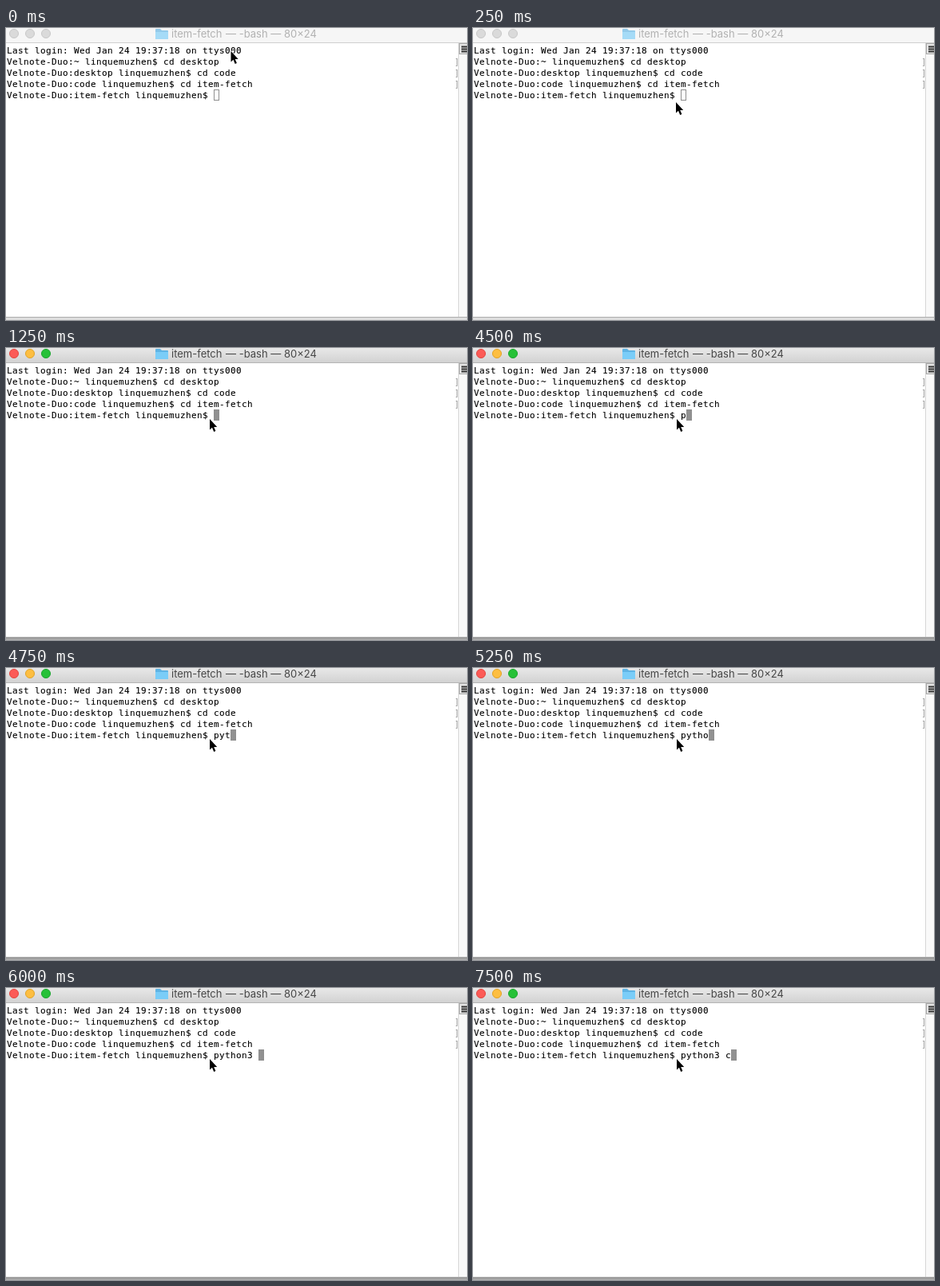
Recreate the animation shown at these times as an HTML page. Size 577 by 366 pixels, loop 8 s.

```html
<!DOCTYPE html>
<html lang="en">
<head>
<meta charset="utf-8">
<title>Terminal</title>
<style>
  html, body { margin: 0; overflow: hidden; background: #fff; }
  svg { display: block; }
  .term { font: 11px "DejaVu Sans Mono", monospace; letter-spacing: calc(7px - 1ch); white-space: pre; stroke: #000; stroke-width: .1px; }
  .mark { fill: #999; stroke: none; }
  .title { font: 13px Inter, sans-serif; fill: #b2b2b2; }
  .bar { fill: #f6f6f6; }
  .edge { fill: #cfcfcf; }
  .lights circle { fill: #dadada; stroke: #c8c8c8; }
  .folder { opacity: .65; }
  .shadow { fill: #dedede; }
  #caret { fill: #fff; stroke: #8f8f8f; }
  .active .title { fill: #474747; }
  .active .bar { fill: url(#chrome); }
  .active .edge { fill: #b4b4b4; }
  .active .lights circle { fill: var(--c); stroke: var(--s); }
  .active .folder { opacity: 1; }
  .active .shadow { fill: url(#drop); }
  .active #caret { fill: #919191; }
</style>
</head>
<body>
<svg id="stage" width="577" height="366" viewBox="0 0 577 366">
  <defs>
    <linearGradient id="chrome" x2="0" y2="1">
      <stop stop-color="#e8e8e8"/><stop offset="1" stop-color="#d2d2d2"/>
    </linearGradient>
    <linearGradient id="drop" x2="0" y2="1">
      <stop stop-color="#929292"/><stop offset="1" stop-color="#b4b4b4"/>
    </linearGradient>
  </defs>
  <rect width="577" height="366" fill="#fff"/>

  <rect class="bar" width="577" height="18"/>
  <rect class="edge" y="18" width="577" height="1"/>
  <g class="lights">
    <circle cx="10" cy="7" r="5.5" style="--c:#fc5b57;--s:#e2463f"/>
    <circle cx="30" cy="7" r="5.5" style="--c:#fdbe41;--s:#e1a325"/>
    <circle cx="50" cy="7" r="5.5" style="--c:#27c138;--s:#18a62b"/>
  </g>
  <g class="folder">
    <path d="M187 13V2q0-1 1-1h5l2 2h7q1 0 1 1v9q0 1-1 1h-14q-1 0-1-1z" fill="#5fb4e4"/>
    <path d="M187 5h16v8q0 1-1 1h-14q-1 0-1-1z" fill="#7acdf8"/>
  </g>
  <text class="title" x="207" y="12">item-fetch</text>
  <text class="title" x="275" y="12">— -bash — 80×24</text>

  <rect x="566" y="19" width="11" height="343" fill="#f9f9f9"/>
  <rect x="566" y="19" width="1" height="343" fill="#d6d6d6"/>
  <rect x="567.5" y="19.5" width="11" height="13" fill="#e4e4e4" stroke="#a8a8a8"/>
  <path d="M570 23.5h7M570 26.5h7M570 29.5h7" stroke="#333" stroke-width="2"/>

  <rect y="362" width="577" height="1" fill="#adadad"/>
  <rect class="shadow" y="363" width="577" height="3"/>

  <g id="lines"></g>
  <rect id="caret" y="77.5" width="6" height="13"/>
  <path id="pointer" d="M0 0V13.5L3 10.8L5.2 16L7.4 15L5.2 10H9.2Z"
        stroke="#fff" stroke-width="1.6" paint-order="stroke"/>
</svg>
<script>
const LOOP = 8000, CELL = 7, ROW = 14, LEFT = 1, BASELINE = 32;
const $ = id => document.getElementById(id);
const prompt = dir => `Velnote-Duo:${dir} linquemuzhen$ `;
const lastPrompt = prompt("item-fetch");

function addText(text, col, row, cls = "term") {
  const el = document.createElementNS("http://www.w3.org/2000/svg", "text");
  el.setAttribute("class", cls);
  el.setAttribute("x", LEFT + col * CELL);
  el.setAttribute("y", BASELINE + row * ROW);
  el.textContent = text;
  $("lines").append(el);
  return el;
}

["Last login: Wed Jan 24 19:37:18 on ttys000",
 prompt("~") + "cd desktop",
 prompt("desktop") + "cd code",
 prompt("code") + "cd item-fetch",
 lastPrompt].forEach((line, row) => addText(line, 0, row));
for (let row = 1; row < 4; row++) addText("]", 80, row, "term mark");
const typed = addText("", lastPrompt.length, 4);

// [start time, value]
const typing = [[0, ""], [4500, "p"], [4750, "pyt"], [5000, "pyth"], [5250, "pytho"],
                [5500, "python"], [6000, "python3 "], [7500, "python3 c"]];
const pointing = [[0, "281.5 29"], [250, "254 93"], [500, "255 89"]];
const valueAt = (steps, t) => steps.findLast(([start]) => start <= t)[1];

function draw(now) {
  const t = now % LOOP;
  const input = valueAt(typing, t);
  typed.textContent = input;
  $("caret").setAttribute("x", LEFT + (lastPrompt.length + input.length) * CELL + .5);
  $("pointer").setAttribute("transform", `translate(${valueAt(pointing, t)})`);
  $("stage").classList.toggle("active", t >= 1250);
  requestAnimationFrame(draw);
}
draw(0);
</script>
</body>
</html>
```
